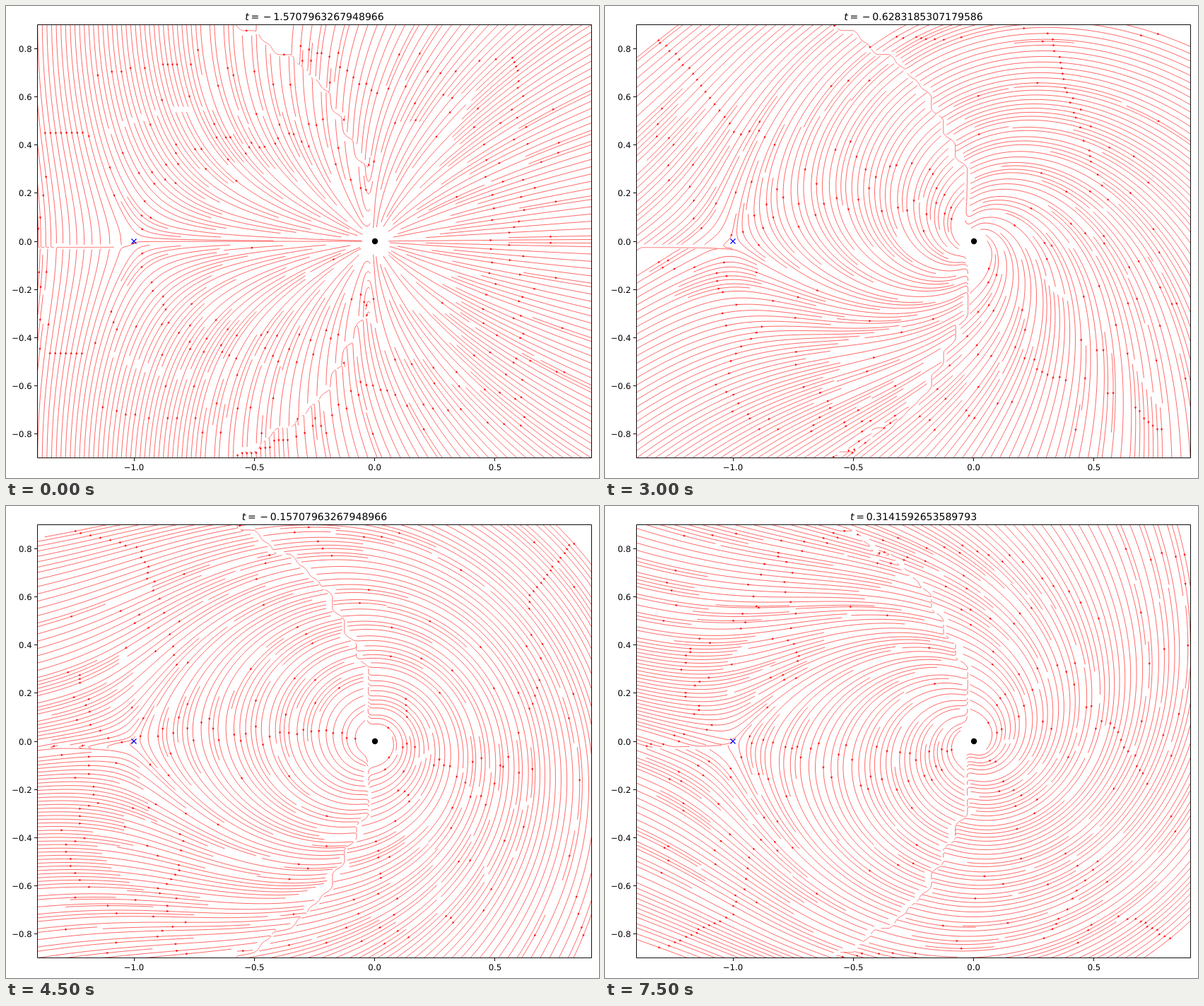
An HTML page for the animation above (8 s loop, 839x668 px).

```html
<!DOCTYPE html>
<html lang="en">
<head>
<meta charset="utf-8">
<title>Rotating flow field</title>
<style>
  html, body { margin: 0; width: 100%; height: 100%; overflow: hidden; background: #fff; }
  svg { display: block; }
  text { font: 11.7px "DejaVu Sans", sans-serif; text-rendering: geometricPrecision; }
  #title { font-size: 14.05px; text-anchor: middle; }
  #lines { fill: none; stroke: #f00; stroke-width: .6; }
  #arrows { fill: #f00; stroke: #f00; stroke-width: .6; stroke-linejoin: miter; }
  #axes { fill: none; stroke: #000; stroke-width: .95; }
</style>
</head>
<body>
<svg width="839" height="668" viewBox="0 0 839 668">
  <clipPath id="clip"><rect x="44.75" y="26.4" width="783.5" height="613.2"/></clipPath>
  <g clip-path="url(#clip)">
    <path id="lines"/>
    <path id="arrows"/>
  </g>
  <circle id="pole" r="4.2"/>
  <path id="zero" d="M-3.5-3.5l7 7m0-7l-7 7" stroke="#00f" stroke-width="1.17"/>
  <path id="axes"/>
  <g id="labels"></g>
  <text id="title" x="436.5" y="19.6"></text>
</svg>
<script>
const NX = 47, NY = 37, STEP = 0.05;        // field samples
const M = 120;                              // occupancy cells per side
const MIN_LEN = 0.1, MAX_LEN = 4, MAX_ERR = 0.003, MAX_DS = 1 / M;
const HEAD = 2.34, TIP_GAP = 0.65;          // arrow head size, setback of its tip
const OUT = 'out', STOP = 'stop';
const SCALE = 340.65, LEFT = 44.75, BOTTOM = 639.6;
const $ = id => document.getElementById(id);
const px = x => LEFT + (x + 1.4) * SCALE;
const py = y => BOTTOM - (y + 0.9) * SCALE;

// Direction field: conj(sqrt((z + 1) / z^2)), turned by the phase t.
function makeField(t) {
  const field = { u: [], v: [], speed: [] };
  for (let j = 0; j < NY; j++) for (let i = 0; i < NX; i++) {
    const x = (i - 28) / 20, y = (j - 18) / 20;
    // The principal root changes sign across the circle |z + 1| = 1.
    const inside = (x + 1) ** 2 + y * y < 1 + 1e-9 * Math.sign(x + 0.3);
    const r = Math.hypot(x, y);
    const size = r ? Math.sqrt(Math.hypot(x + 1, y)) / r : NaN;
    const arg = Math.atan2(y, x + 1) / 2 - Math.atan2(y, x) + (inside ? Math.PI : 0);
    const angle = -arg - t - Math.PI / 2;
    const u = size * Math.cos(angle), v = size * Math.sin(angle);
    field.u.push(u);
    field.v.push(v);
    field.speed.push(Math.hypot(u / (NX - 1), v / (NY - 1)));
  }
  return field;
}

function sample(a, x, y) {
  const i = Math.floor(x), j = Math.floor(y), fx = x - i, fy = y - j;
  const i2 = Math.min(i + 1, NX - 1), j2 = Math.min(j + 1, NY - 1);
  const low = a[j * NX + i] * (1 - fx) + a[j * NX + i2] * fx;
  const high = a[j2 * NX + i] * (1 - fx) + a[j2 * NX + i2] * fx;
  return low * (1 - fy) + high * fy;
}

const inGrid = (x, y) => x >= 0 && x <= NX - 1 && y >= 0 && y <= NY - 1;
const cellAt = (x, y) =>
  Math.round(y * (M - 1) / (NY - 1)) * M + Math.round(x * (M - 1) / (NX - 1));

// Seeds run in a spiral from the border inwards.
function* seeds() {
  let x = 0, y = 0, x0 = 0, y0 = 1, x1 = M - 1, y1 = M - 1, dir = 0;
  for (let n = 0; n < M * M; n++) {
    yield [x, y];
    if (dir === 0) { if (++x >= x1) { x1--; dir = 1; } }
    else if (dir === 1) { if (++y >= y1) { y1--; dir = 2; } }
    else if (dir === 2) { if (--x <= x0) { x0++; dir = 3; } }
    else if (--y <= y0) { y0++; dir = 0; }
  }
}

function streamlines(t) {
  const field = makeField(t), taken = new Uint8Array(M * M), result = [];
  let cell = -1, trail = [];

  function enter(x, y) {
    const c = cellAt(x, y);
    if (c === cell) return true;
    if (taken[c]) return false;
    taken[c] = 1;
    trail.push(c);
    cell = c;
    return true;
  }

  function slope(x, y, dir) {
    if (!inGrid(x, y)) return OUT;
    const s = sample(field.speed, x, y);
    if (!(s > 0)) return STOP;
    return [dir * sample(field.u, x, y) / s, dir * sample(field.v, x, y) / s];
  }

  // Last straight step up to the border.
  function reachBorder(pts, dir) {
    const [x, y] = pts[pts.length - 1], k = slope(x, y, dir);
    if (k === STOP) return 0;
    const room = (p, d, max) => d === 0 ? Infinity : d < 0 ? -p / d : (max - p) / d;
    const ds = Math.min(room(x, k[0], NX - 1), room(y, k[1], NY - 1));
    pts.push([x + k[0] * ds, y + k[1] * ds]);
    return ds;
  }

  // Adaptive second-order integration.
  function trace(x, y, dir) {
    const pts = [];
    let ds = MAX_DS, len = 0;
    for (;;) {
      let k1 = OUT, k2 = OUT;
      if (inGrid(x, y)) {
        pts.push([x, y]);
        k1 = slope(x, y, dir);
        if (k1 === STOP) break;
        k2 = slope(x + ds * k1[0], y + ds * k1[1], dir);
      }
      if (k2 === STOP) break;
      if (k2 === OUT) {
        if (pts.length) len += reachBorder(pts, dir);
        break;
      }
      const dx = ds * (k1[0] + k2[0]) / 2, dy = ds * (k1[1] + k2[1]) / 2;
      const err = Math.hypot((dx - ds * k1[0]) / (NX - 1), (dy - ds * k1[1]) / (NY - 1));
      if (err < MAX_ERR) {
        x += dx;
        y += dy;
        if (!inGrid(x, y) || !enter(x, y) || len + ds > MAX_LEN) break;
        len += ds;
      }
      ds = err === 0 ? MAX_DS : Math.min(MAX_DS, 0.85 * ds * Math.sqrt(MAX_ERR / err));
    }
    return { pts, len };
  }

  for (const [mx, my] of seeds()) {
    if (taken[my * M + mx]) continue;
    const x = mx * (NX - 1) / (M - 1), y = my * (NY - 1) / (M - 1);
    trail = [];
    if (!enter(x, y)) continue;
    const back = trace(x, y, -1);
    cell = cellAt(x, y);
    const ahead = trace(x, y, 1);
    if (back.len + ahead.len > MIN_LEN) {
      result.push(back.pts.reverse().concat(ahead.pts.slice(1)));
    } else {
      for (const c of trail) taken[c] = 0;
    }
  }
  return result.map(line =>
    line.map(([i, j]) => [LEFT + i * STEP * SCALE, BOTTOM - j * STEP * SCALE]));
}

const toPath = pts => 'M' + pts.map(p => p[0].toFixed(2) + ' ' + p[1].toFixed(2)).join('L');

// Arrow head at the middle of a line.
function arrow(pts) {
  const sums = [];
  let total = 0;
  for (let i = 1; i < pts.length; i++) {
    total += Math.hypot(pts[i][0] - pts[i - 1][0], pts[i][1] - pts[i - 1][1]);
    sums.push(total);
  }
  const n = sums.findIndex(s => s >= total / 2);
  const [ax, ay] = pts[n], [bx, by] = pts[n + 1];
  const d = Math.hypot(bx - ax, by - ay), ux = (bx - ax) / d, uy = (by - ay) / d;
  const at = (back, side) =>
    [(ax + bx) / 2 - ux * back - uy * side, (ay + by) / 2 - uy * back + ux * side];
  const base = TIP_GAP + HEAD;
  return toPath([at(base, HEAD / 2), at(TIP_GAP, 0), at(base, -HEAD / 2)]) + 'Z';
}

function makeScene(k) {
  const t = (k - 10) * (Math.PI / 20), lines = streamlines(t);
  const value = t ? String(Math.abs(t)) : '0.0';
  const gap = (em, s) => `<tspan dx="${em}em">${s}</tspan>`;
  return {
    lines: lines.map(toPath).join(''),
    arrows: lines.map(arrow).join(''),
    title: '<tspan font-style="italic">t</tspan>' + gap(0.195, '=') +
      (t < 0 ? gap(0.39, '\u2212') : '') + gap(0.195, value)
  };
}

function drawAxes() {
  const snap = p => Math.floor(p) + 0.5;
  const name = n => n.toFixed(1).replace('-', '\u2212');
  const place = (id, x, y) =>
    $(id).setAttribute('transform', `translate(${Math.round(px(x))} ${Math.round(py(y))})`);
  let d = 'M44.5 26.5H828.5V639.5H44.5Z', labels = '';
  for (const x of [-1, -0.5, 0, 0.5]) {
    d += `M${snap(px(x))} 639.5v4.6`;
    labels += `<text x="${px(x)}" y="657.2" text-anchor="middle">${name(x)}</text>`;
  }
  for (let i = -4; i <= 4; i++) {
    const y = py(i / 5);
    d += `M44.5 ${snap(y)}h-4.6`;
    labels += `<text x="36.7" y="${y + 4.5}" text-anchor="end">${name(i / 5)}</text>`;
  }
  $('axes').setAttribute('d', d);
  $('labels').innerHTML = labels;
  place('pole', 0, 0);
  place('zero', -1, 0);
}

drawAxes();
const scenes = Array.from({ length: 13 }, (_, k) => makeScene(k));
let shown = -1;

function show() {
  const ms = performance.now() % 8000;
  // The middle scene rests for two seconds.
  const k = Math.floor((ms < 5000 ? ms : Math.max(5000, ms - 1500)) / 500);
  if (k !== shown) {
    shown = k;
    $('lines').setAttribute('d', scenes[k].lines);
    $('arrows').setAttribute('d', scenes[k].arrows);
    $('title').innerHTML = scenes[k].title;
  }
  requestAnimationFrame(show);
}
show();
</script>
</body>
</html>
```
